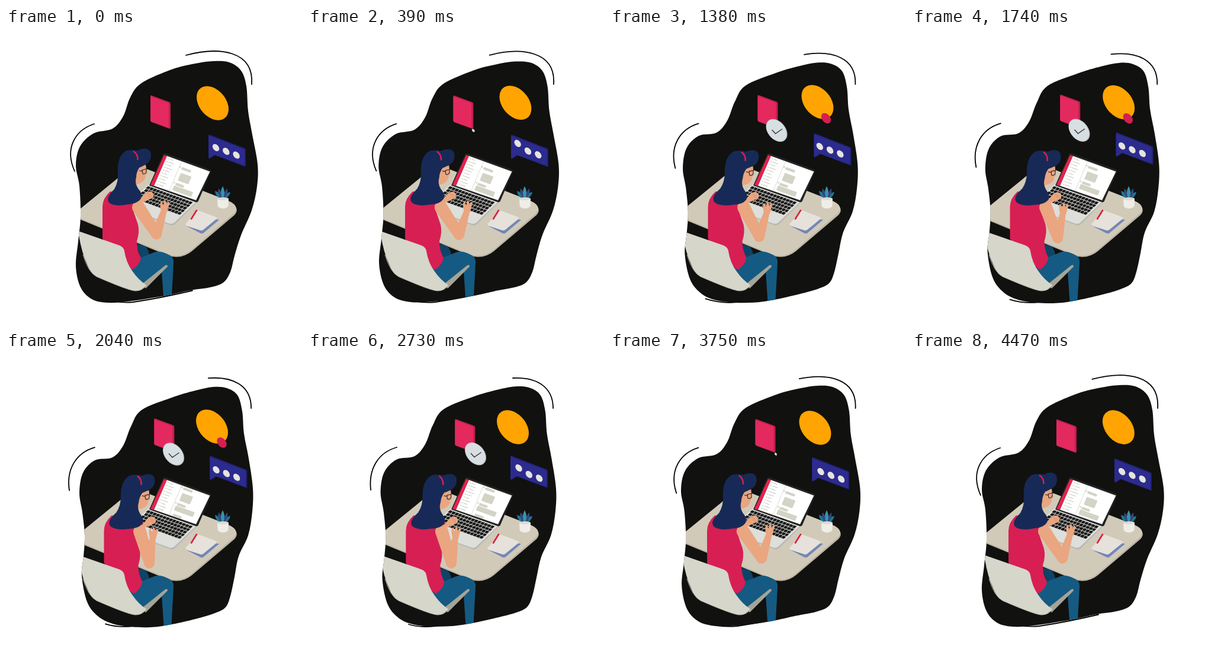
Animation of 500 by 500 pixels, one loop 4530 ms. Source, as an HTML page:

```html
<!DOCTYPE html>
<html lang="en">
<head>
<meta charset="utf-8">
<title>Working at a desk</title>
<style>
html, body { margin: 0; width: 100%; height: 100%; overflow: hidden; background: #fff; }
svg { display: block; width: 100vw; height: 100vh; }
.line { fill: none; stroke: #000; stroke-width: 1.8; stroke-linecap: round; }
.skin { fill: #e9a680; }
.red { fill: #d71f53; }
.hair { fill: #172a57; }
.block { fill: #d3d3c6; }
</style>
</head>
<body>
<svg viewBox="0 0 500 500">
  <defs>
    <clipPath id="clip"><path id="clipShape"/></clipPath>
    <clipPath id="page"><path d="M271.500 216 344.500 242.500 321 291 250 266.500Z"/></clipPath>
  </defs>

  <path id="arcTop" class="line"/>
  <path id="arcLeft" class="line"/>
  <path id="arcBottom" class="line"/>
  <path id="blob" fill="#11110f"/>

  <g clip-path="url(#clip)">
    <!-- table -->
    <path fill="#bcb5a4" d="M100 328 186 257 Q212 234 240 240 L376 294 Q397 303 386 316 L314 377 Q297 391 275 385 L100 313Z"/>
    <path fill="#d2cab9" d="M100 326 186 256 Q212 233 240 239 L376 292 Q396 301 385 313 L313 375 Q296 389 275 383 L100 311Z"/>

    <!-- laptop -->
    <path fill="#b9b9b3" d="M241 266 323 294 285 332 Q281 335 275 332 L200 305Z"/>
    <path fill="#dededa" d="M241 264 323 292 284 329 Q280 332 275 330 L200 303Z"/>
    <g id="keys" transform="matrix(1 .36 -1 .98 240 267)" stroke="#171717" stroke-width="3.700" stroke-dasharray="4.700 .75"/>
    <path fill="#232323" d="M265 214 Q267 211 270 212 L344 239 Q347 240 346 243 L325 292 Q324 295 320 294 L242 266Z"/>
    <path fill="#fff" d="M271.500 216 344.500 242.500 321 291 250 266.500Z"/>
    <path fill="#e3244f" d="M267 214.500 272 216 249.500 267 244 265Z"/>
    <g clip-path="url(#page)">
      <g transform="matrix(1 .36 -.42 1 271 215)">
        <path d="M26 -2V56" stroke="#dadad4" stroke-width=".8"/>
        <g id="rows" fill="#c9c9bf"></g>
        <g id="content" class="block">
          <rect x="30" y="9" width="16" height="4" rx="1.500"/>
          <rect x="32" y="18" width="18" height="13" rx="1"/>
          <rect x="31" y="35" width="14" height="4" rx="1.500"/>
          <rect x="30" y="40" width="32" height="8" rx="1"/>
          <rect x="31" y="53" width="15" height="4" rx="1.500"/>
          <circle cx="27.500" cy="10" r="1.300"/>
          <circle cx="28.500" cy="36" r="1.300"/>
        </g>
      </g>
    </g>

    <!-- notebook and pen -->
    <path fill="#7487b6" d="M302 333 326 319 360 324 334 346Q332 348 329 347Z"/>
    <path fill="#e6e1da" d="M303 331 322 310Q324 308 327 309L354 319Q358 321 355 323L333 341Q330 343 326 341L304 334Q302 333 303 331Z"/>
    <path d="M322 308 313 322.500" stroke="#d71f3f" stroke-width="2.600" stroke-linecap="round"/>

    <!-- plant -->
    <path fill="#1e7693" d="M366 290Q353 285 353 275Q363 278 366 290Q369 278 379 277Q378 286 366 290Z"/>
    <path fill="#33477c" d="M365 290Q356 280 359 271Q366 277 366 290Q367 277 374 271Q376 281 367 290Z"/>
    <path fill="#3a93a8" d="M366 290Q360 278 366 267Q372 278 366 290Z"/>
    <path fill="#efede8" d="M357 288H376L375.500 301Q372 305 366.500 305Q361 305 357.500 301Z"/>
    <ellipse cx="366.500" cy="288.500" rx="9.500" ry="2.500" fill="#dddbd3"/>

    <!-- legs -->
    <path fill="#0e4468" d="M220 364 236 369Q241 375 242 383L228 390Z"/>
    <path fill="#155a82" d="M208 408 228 388 250 379Q260 375 275 383Q284 387 283 397L279 470H267L263 411 235 434 220 430Z"/>

    <!-- torso -->
    <path id="torso" class="red" d="M176 276Q163 288 163 302V356L190 395 214 408Q226 400 228 388Q221 376 221 360Q226 345 223 332L214 306Q216 296 232 292L226 284Z"/>

    <!-- chair -->
    <path fill="#a5a498" d="M229 433 269 401Q273 399 273 403L236 440Z"/>
    <path fill="#d6d6cb" d="M110 340 125 344 191 367Q199 370 200 377Q203 396 213 410Q224 426 237 434Q230 444 219 444Q208 444 153 420Q143 415 137 399Q128 380 123 350Z"/>
    <path fill="none" stroke="#b8b8ac" d="M130 383Q139 413 153 420Q208 444 219 444Q230 444 237 435"/>

    <!-- arms -->
    <g id="leftHand" class="skin">
      <path d="M224 292 232 283Q236 276 244 276Q250 278 249 283Q250 287 243 289L230 295Z"/>
      <path d="M238 279 246 283M240 283 247 287" fill="none" stroke="#cf8b68" stroke-width=".8"/>
    </g>
    <path id="arm" class="skin"/>
    <g id="hand" class="skin">
      <path d="M-5 12Q-9 3 -7 -5Q-5 -8 -4 -3L-2 0 -1 -7Q1 -10 2 -6L3 -1 5 -5Q8 -7 8 -3L4 12Z"/>
    </g>
  </g>

  <!-- head -->
  <g id="head">
    <path class="skin" d="M218 236 236 231Q237 237 237 240L238.500 246Q238 248 236 248Q236 253 234 256Q231 261 224 263L216 266Z"/>
    <path class="hair" d="M204 207Q213 205 222 207Q229 203 237 204Q245 206 245 215Q245 225 237 230Q230 234 225 236Q220 244 220 252Q217 262 223 271Q232 281 228 288Q222 297 206 298Q188 302 177 297Q170 293 173 285Q176 279 183 272Q190 260 189 245Q187 215 204 207Z"/>
    <path class="skin" d="M222 245Q225 241 227 245Q227 250 222 251Z"/>
    <path d="M225 241 231 242M230 240 237 238 237 244Q234 248 231 246Z" fill="none" stroke="#32282d" stroke-width="1.200"/>
    <path d="M215 208Q223 213 222.500 223" fill="none" stroke="#d71f53" stroke-width="2.600"/>
  </g>

  <!-- floating icons -->
  <g id="book">
    <path fill="#bf1f4e" d="M244 115Q244 113 246 114L276 125Q278 126 278 128V168Q278 171 276 170L246 159Q244 158 244 156Z"/>
    <path fill="#e4295f" d="M244 117Q244 115 246 116L273 126Q275 127 275 129V166Q275 169 273 168L246 158.500Q244 158 244 156Z"/>
  </g>
  <g id="clock">
    <g transform="matrix(1 .373 0 1 0 0)">
      <circle r="18" fill="#bcc6cc"/>
      <circle cx="-.5" r="17" fill="#d8dfe2"/>
    </g>
    <path d="M-8 -1 -2 5.500 9.500 -2.500" fill="none" stroke="#3a3434" stroke-width="1.400"/>
  </g>
  <g id="sun"><circle r="27" transform="matrix(1 .373 0 1 0 0)" fill="#ffa400"/></g>
  <g id="badge"><circle r="8.200" transform="matrix(1 .373 0 1 0 0)" fill="#d2204f"/></g>
  <g id="chat">
    <path fill="#201f70" d="M342 181Q342 179 344 180L403 203Q405 204 405 206V232Q405 235 403 234L353 215 345 220Q342 222 342 219Z"/>
    <path fill="#2c2b8e" d="M342 183Q342 181 344 182L401 204Q403 205 403 207V231Q403 233 401 232L352 214 345 219Q342 221 342 218Z"/>
  </g>
  <g id="dots" fill="#e6e4df"></g>
</svg>
<script>
const LOOP = 4530;
const TIMES = [0, 810, 1380, 2040, 2730, 3750, LOOP];
const $ = id => document.getElementById(id);
const set = (id, name, value) => $(id).setAttribute(name, value);
const move = (id, x, y, rest = '') => set(id, 'transform', `translate(${x} ${y}) ${rest}`);
const nums = s => s.trim().split(/[\s,]+/).map(Number);
const mix = (a, b, k) => a.map((v, i) => v + (b[i] - v) * k);
const ramp = (t, a, b) => {
  const k = Math.min(1, Math.max(0, (t - a) / (b - a)));
  return k * k * (3 - 2 * k);
};

// Smooth periodic curve through six values placed at TIMES
function curve(t, v) {
  const n = v.length;
  const at = i => TIMES[(i + n) % n] + LOOP * Math.floor(i / n);
  const val = i => v[(i + n) % n];
  const slope = i => (val(i + 1) - val(i - 1)) / (at(i + 1) - at(i - 1));
  let i = 0;
  while (i < n - 1 && t >= TIMES[i + 1]) i++;
  const d = at(i + 1) - at(i), k = (t - at(i)) / d, k2 = k * k, k3 = k2 * k;
  return val(i) * (2 * k3 - 3 * k2 + 1) + val(i + 1) * (3 * k2 - 2 * k3)
    + d * (slope(i) * (k3 - 2 * k2 + k) + slope(i + 1) * (k3 - k2));
}

// Closed smooth outline through x,y pairs
function outline(p) {
  const n = p.length / 2;
  const at = i => [p[(i + n) % n * 2], p[(i + n) % n * 2 + 1]];
  let d = `M${at(0)}`;
  for (let i = 0; i < n; i++) {
    const [a, b, c, e] = [at(i - 1), at(i), at(i + 1), at(i + 2)];
    const out = b.map((v, j) => v + (c[j] - a[j]) / 6);
    const into = c.map((v, j) => v - (e[j] - b[j]) / 6);
    d += `C${out} ${into} ${c}`;
  }
  return d + 'Z';
}

// Rounded limb that tapers from radius r to radius s
function limb(x, y, r, u, v, s) {
  const len = Math.hypot(u - x, v - y), nx = (y - v) / len, ny = (u - x) / len;
  return `M${x + nx * r} ${y + ny * r}L${u + nx * s} ${v + ny * s}`
    + `A${s} ${s} 0 0 0 ${u - nx * s} ${v - ny * s}L${x - nx * r} ${y - ny * r}`
    + `A${r} ${r} 0 0 0 ${x + nx * r} ${y + ny * r}Z`;
}

const blobA = nums(`350,56 377,58 397,72 406,98 409,140 416,180 425,230 424,268 415,308
  397,350 386,385 379,412 367,430 345,438 312,443 275,451 240,457 205,462 172,464
  145,458 126,438 118,403 122,360 126,318 124,267 118,232 125,200 148,178 180,170
  198,149 210,117 229,93 280,70 320,60`);
const blobB = nums(`350,59 373,61 391,73 399,100 402,138 410,180 417,230 416,270 409,310
  393,345 386,380 379,412 371,431 353,441 320,451 275,461 243,465 210,464 180,459
  155,446 137,422 128,378 131,345 133,310 129,271 124,238 130,204 150,183 180,178
  198,158 211,126 229,98 280,77 320,65`);
const topA = nums('304 46 360 31 419 38 415 95'), topB = nums('346 44 385 42 414 58 414 95');
const leftA = nums('149 162 118 172 98 202 116 242'), leftB = nums('150 161 118 170 102 198 106 233');
const bezier = p => `M${p.slice(0, 2)}C${p.slice(2)}`;

for (let i = 0; i < 5; i++) {
  $('keys').innerHTML += `<path d="M${i % 2} ${2 + i * 4.5}H76"/>`;
}
for (let i = 0; i < 10; i++) {
  const y = 4 + i * 4.8;
  $('rows').innerHTML += `<circle cx="5" cy="${y}" r=".9"/><rect x="7" y="${y - .5}" width="${6 + i * 3 % 5}" height="1"/>`;
}
for (let i = 0; i < 3; i++) {
  $('dots').innerHTML += `<circle id="dot${i}" r="5.700"/>`;
}

function draw(t) {
  const c = (...v) => curve(t, v);
  const sway = c(0, .53, .84, 1, .76, .32);
  const lag = c(0, .24, .57, .9, 1, .38);
  const lean = c(0, .9, 1, 1, .93, .4);

  const blob = outline(mix(blobA, blobB, sway));
  set('blob', 'd', blob);
  set('clipShape', 'd', blob);
  set('arcTop', 'd', bezier(mix(topA, topB, lag)));
  set('arcLeft', 'd', bezier(mix(leftA, leftB, lag)));
  set('arcBottom', 'd', `M${150 + 20 * lag} ${454 + 6 * lag}Q188 466 215 463Q262 456 315 443.5`);

  move('torso', 2.5 * lean, 0);
  move('head', 2 * lean, .3 * lean, `rotate(${3.4 * lean} 200 292)`);
  move('leftHand', c(0, 2, 2, 4, 4, 1), c(0, 1, 1, 2, 2, 0));
  const ex = c(254, 256, 252, 242, 242, 256), ey = c(348, 350, 352, 356, 356, 348);
  const hx = c(268, 271, 266, 249, 250, 270), hy = c(299, 300, 302, 304, 303, 298);
  set('arm', 'd', limb(224 + 2 * lean, 303, 11, ex, ey, 9) + limb(ex, ey + .5, 9, hx - 1, hy + 9, 4.8));
  move('hand', hx, hy);

  const scroll = ramp(t, 1600, 1950) - ramp(t, 2950, 3400);
  move('content', 0, -6.5 * scroll);

  const bx = c(0, 3.5, 5.5, 6.3, 4.3, 1.5);
  move('book', bx, c(0, .3, -.5, -1.5, -.5, -.5));
  move('clock', c(279, 280, 281.5, 283, 283, 280), c(173, 173.2, 173, 172.5, 172, 172.5),
    `scale(${ramp(t, 300, 700) - ramp(t, 3450, 3830)})`);
  const sx = c(349, 351.5, 350.5, 348, 346, 346.5), sy = c(127, 125.5, 125, 126, 127, 128);
  move('sun', sx, sy);
  move('badge', c(365, 365, 365, 364.5, 364, 364), c(152, 152, 152.5, 153, 153, 153),
    `scale(${ramp(t, 1000, 1300) - ramp(t, 2250, 2600)})`);
  move('chat', c(0, 2, 2.5, 2.3, 0, -.7), c(0, 0, -2, -4.5, -4.7, -2));

  const dx = c(354.5, 354, 354.3, 355, 356, 356), dy = c(202, 201, 200, 199, 200.5, 202);
  for (let i = 0; i < 3; i++) {
    const hop = start => {
      const k = (t - start - i * 200) / 350;
      return k > 0 && k < 1 ? 7 * Math.sin(Math.PI * k) : 0;
    };
    set('dot' + i, 'transform',
      `matrix(1 .373 0 1 ${dx + 17.3 * i} ${dy + 6.3 * i - hop(250) - hop(2650)})`);
  }
}

const begin = performance.now();
function tick() {
  draw((performance.now() - begin) % LOOP);
  requestAnimationFrame(tick);
}
tick();
</script>
</body>
</html>
```
